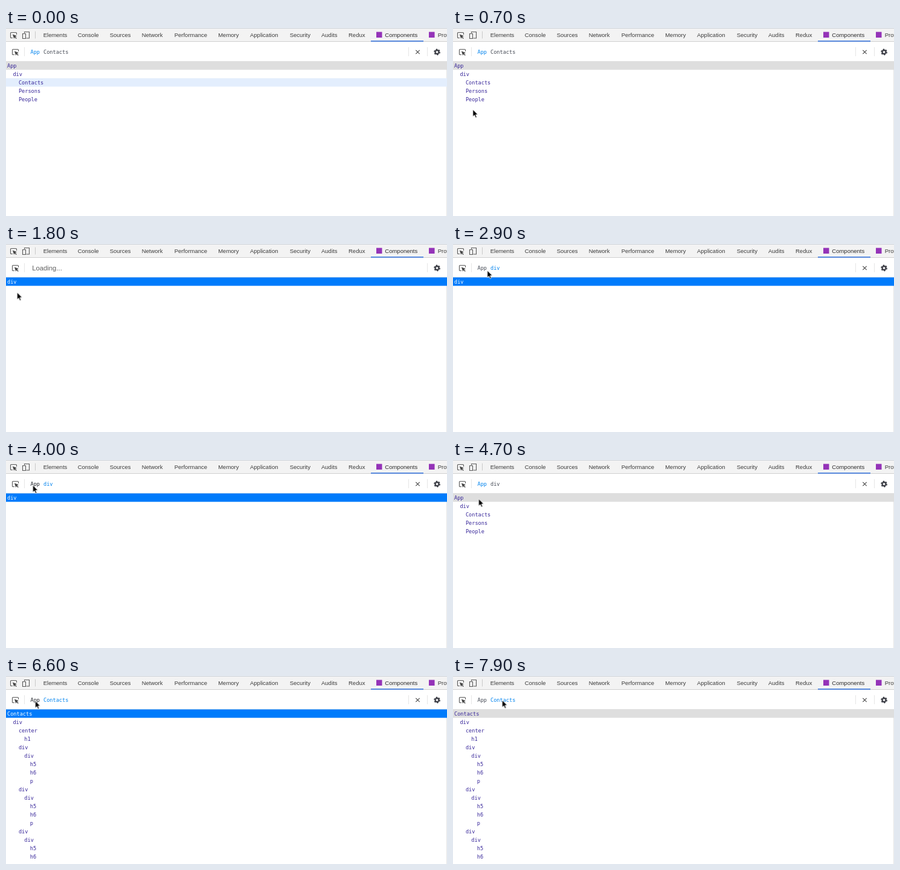
An HTML page that plays this animation: 730 by 313 pixels, repeating every 8000 ms.

```html
<!DOCTYPE html>
<html lang="en">
<head>
<meta charset="utf-8">
<title>Component tree inspector</title>
<style>
  html, body { margin: 0; width: 100%; height: 100%; overflow: hidden; background: #fff; }
  svg { display: block; }
  svg * { animation: 8s step-end infinite; }

  :root {
    --name: #38279a; --active: #0083ee; --word: #454a55; --dark: #1d2027;
    --select: #007bfb; --idle: #dedede;
  }
  .tab { font: 9.5px "Liberation Sans", Arial, sans-serif; fill: #3c3c3c; }
  .tab.on { fill: #2c2c2c; }
  .mono { font: 8.6px "DejaVu Sans Mono", monospace; white-space: pre; }
  .tree { fill: var(--name); }
  .line { stroke: #e6e6e6; }
  .icon { fill: none; stroke: #5a5a5a; stroke-width: 1.1; }

  /* tree views */
  #app { animation-name: view-app; }
  #div { animation-name: view-div; }
  #list { animation-name: view-list; }
  @keyframes view-app {
    0%, 51.2% { opacity: 1; }
    22.4%, 74.9%, 100% { opacity: 0; }
  }
  @keyframes view-div {
    0%, 51.2%, 100% { opacity: 0; }
    22.4% { opacity: 1; }
  }
  @keyframes view-list {
    0% { opacity: 0; }
    74.9%, 100% { opacity: 1; }
  }

  /* row highlights */
  #hover { fill: #e3eefd; animation-name: hover; }
  @keyframes hover {
    0%, 12.4%, 62.9% { opacity: 1; transform: translateY(28px); }
    1.2%, 18.7%, 72.4%, 100% { opacity: 0; transform: none; }
    9.9% { opacity: 1; transform: translateY(56px); }
    11.2% { opacity: 1; transform: translateY(42px); }
    14.9%, 59.9% { opacity: 1; transform: translateY(14px); }
  }
  #select { animation-name: select; }
  @keyframes select {
    0%, 51.2%, 96.2%, 100% { fill: var(--idle); transform: none; }
    18.7% { fill: var(--select); transform: translateY(14px); }
    22.4%, 74.9% { fill: var(--select); transform: none; }
    72.4% { fill: var(--select); transform: translateY(28px); }
  }
  #app text:nth-child(2) { animation-name: pick-div; }
  #app text:nth-child(3) { animation-name: pick-contacts; }
  #div text { fill: #fff; }
  #list text:first-child { animation-name: blur-list; }
  @keyframes pick-div {
    0%, 22.4%, 100% { fill: var(--name); }
    18.7% { fill: #fff; }
  }
  @keyframes pick-contacts {
    0%, 74.9%, 100% { fill: var(--name); }
    72.4% { fill: #fff; }
  }
  @keyframes blur-list {
    0% { fill: #fff; }
    96.2%, 100% { fill: var(--name); }
  }

  /* breadcrumbs */
  #loading { font: 11.3px "Liberation Sans", Arial, sans-serif; fill: #626262; animation-name: loading; }
  #ready { animation-name: ready; }
  #crumb-app { animation-name: crumb-app; }
  #crumb-div { animation-name: crumb-div; }
  #crumb-list { animation-name: crumb-list; }
  @keyframes loading {
    0%, 23.7%, 76.2%, 100% { opacity: 0; }
    22.4%, 74.9% { opacity: 1; }
  }
  @keyframes ready {
    0%, 23.7%, 76.2%, 100% { opacity: 1; }
    22.4%, 74.9% { opacity: 0; }
  }
  @keyframes crumb-app {
    0%, 51.2% { fill: var(--active); }
    23.7%, 76.2%, 87.4%, 100% { fill: var(--word); }
    46.2%, 81.2% { fill: var(--dark); }
  }
  @keyframes crumb-div {
    0%, 74.9%, 100% { fill: transparent; }
    23.7% { fill: var(--active); }
    51.2% { fill: var(--word); }
  }
  @keyframes crumb-list {
    0% { fill: var(--word); }
    22.4% { fill: transparent; }
    76.2%, 100% { fill: var(--active); }
  }

  /* pointer */
  #pointer { animation-name: move, appear; animation-timing-function: linear, step-end; }
  @keyframes move {
    0%, 5% { transform: translate(40px, 175px); }
    13.75% { transform: translate(23.4px, 83.6px); }
    15% { transform: translate(20px, 81px); }
    16.25%, 27.5% { transform: translate(18.4px, 80.6px); animation-timing-function: ease-in-out; }
    37.5%, 43.75% { transform: translate(58px, 43px); animation-timing-function: ease-out; }
    50%, 53.75% { transform: translate(44.4px, 42px); }
    65%, 66.25% { transform: translate(40px, 93px); }
    70%, 76.25% { transform: translate(34.4px, 89.4px); }
    82.5% { transform: translate(48.4px, 41.4px); animation-timing-function: ease-in-out; }
    93.75%, 100% { transform: translate(81.4px, 40.3px); }
  }
  @keyframes appear {
    0% { opacity: 0; }
    1.2%, 100% { opacity: 1; }
  }
</style>
</head>
<body>
<svg width="730" height="313" viewBox="0 0 730 313">
  <defs>
    <g id="picker">
      <path class="icon" d="M4 9.5H1.5a1 1 0 0 1-1-1v-7a1 1 0 0 1 1-1h8a1 1 0 0 1 1 1V4"/>
      <path fill="#444" d="M4 3.5l7 2.8-2.7 1.1 2.5 2.5-1 1-2.5-2.5L6.3 10.9z"/>
    </g>
  </defs>

  <!-- tab bar -->
  <rect width="730" height="22" fill="#f3f3f3"/>
  <path d="M0 .5H730" stroke="#cdd3da"/>
  <path d="M0 22.5H730" stroke="#d0d0d0"/>
  <use href="#picker" x="7" y="7"/>
  <path class="icon" d="M30.5 8.5V6.5h8v10.500h-5M27.5 9.5h5v8h-5z"/>
  <path d="M48.5 5.5v12" stroke="#c8c8c8"/>
  <g id="tabs"></g>
  <rect x="613" y="6.5" width="9.5" height="9.5" fill="#9433b8"/>
  <rect x="700" y="6.5" width="9.5" height="9.5" fill="#9433b8"/>
  <rect x="604" y="21" width="87" height="1.600" fill="#3b78e0"/>

  <!-- toolbar -->
  <use href="#picker" x="10" y="35"/>
  <path class="line" d="M30.5 32v15M697.5 32v15M0 55.5H730M729.5 56V313"/>
  <g id="ready">
    <path class="line" d="M666.5 32v15"/>
    <path d="M678.300 36.800l6.400 6.400m0-6.400l-6.400 6.400" stroke="#4a4a4a" stroke-width="1.1"/>
    <g class="mono">
      <text id="crumb-app" x="40.5" y="42.500">App</text>
      <text id="crumb-div" x="62" y="42.500">div</text>
      <text id="crumb-list" x="62" y="42.500">Contacts</text>
    </g>
  </g>
  <text id="loading" x="43.2" y="43.500">Loading...</text>
  <g transform="translate(713.5 40)" fill="none" stroke="#3f4149">
    <circle r="3" stroke-width="2.4"/>
    <circle r="4.600" stroke-width="1.600" stroke-dasharray="2.410 2.410"/>
  </g>

  <!-- component tree -->
  <rect id="hover" y="55.6" width="730" height="14"/>
  <rect id="select" y="55.6" width="730" height="14"/>
  <g class="mono tree">
    <g id="app"></g>
    <g id="div"></g>
    <g id="list"></g>
  </g>

  <path id="pointer" d="M0 0V11.800L2.700 9.300 4.500 13.500 6.500 12.700 4.700 8.600H8.300z"
        fill="#000" stroke="#fff" stroke-width=".8"/>
</svg>
<script>
  const byId = id => document.getElementById(id);

  function addText(parent, x, y, label, cls = "") {
    const el = document.createElementNS("http://www.w3.org/2000/svg", "text");
    el.setAttribute("x", x);
    el.setAttribute("y", y);
    el.setAttribute("class", cls);
    el.textContent = label;
    parent.append(el);
  }

  const tabs = {
    Elements: 61.7, Console: 118.7, Sources: 171.7, Network: 224.7, Performance: 278.7,
    Memory: 351.2, Application: 404, Security: 469.7, Audits: 522, Redux: 567,
    Components: 627.3, Profiler: 714.7
  };
  for (const [label, x] of Object.entries(tabs))
    addText(byId("tabs"), x, 14.8, label, label === "Components" ? "tab on" : "tab");

  // Each row is written as depth:name.
  function addTree(id, rows) {
    rows.split(" ").forEach((row, i) => {
      const [depth, name] = row.split(":");
      addText(byId(id), 2 + depth * 9.45, 65.6 + i * 14.05, name);
    });
  }
  const card = " 2:div 3:div 4:h5 4:h6 4:p";
  addTree("app", "0:App 1:div 2:Contacts 2:Persons 2:People");
  addTree("div", "0:div");
  addTree("list", "0:Contacts 1:div 2:center 3:h1" + card.repeat(3));
</script>
</body>
</html>
```
